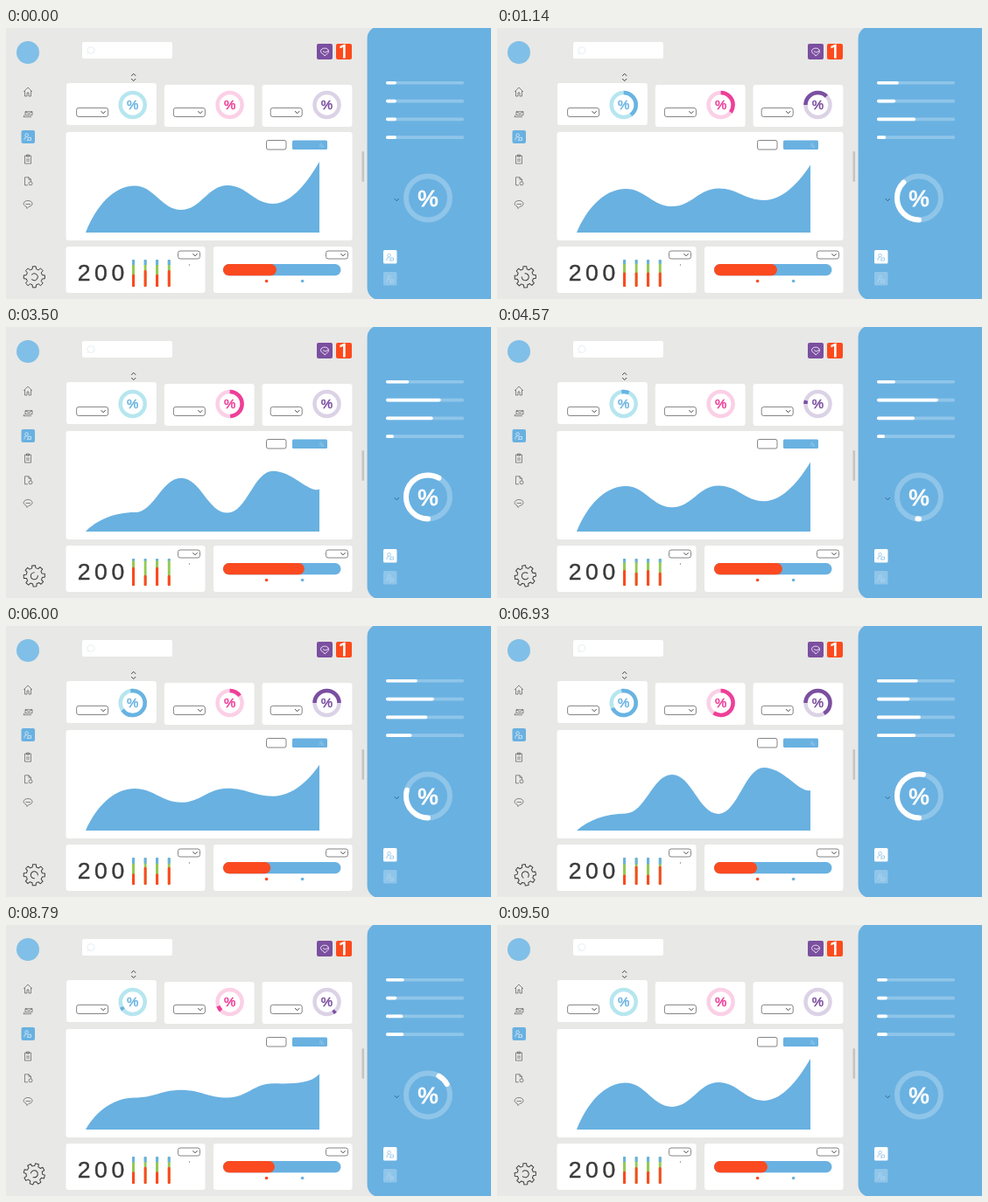
Recreate the animation shown at these times as an HTML page with a canvas. Size 554x310 px, loop 9.57 s.

```html
<!DOCTYPE html>
<html lang="en">
<head>
<meta charset="utf-8">
<title>Dashboard</title>
<style>
html, body { margin: 0; width: 100%; height: 100%; overflow: hidden; background: #e8e8e6; }
canvas { display: block; width: 554px; height: 310px; }
</style>
</head>
<body>
<canvas id="stage"></canvas>
<script>
const W = 554, H = 310, LOOP = 9.57;
const BLUE = '#69b1e1', PALE = '#8fc5e9', RED = '#fb4a20', GREEN = '#93c953', PURPLE = '#7b4fa0', INK = '#444';
const canvas = document.getElementById('stage');
const ctx = canvas.getContext('2d');
const scale = window.devicePixelRatio || 1;
canvas.width = W * scale;
canvas.height = H * scale;

const mix = (a, b, u) => a + (b - a) * u;

// Eased step from 0 to 1 between two times in seconds.
function ramp(t, from, to) {
  const u = Math.min(1, Math.max(0, (t - from) / (to - from)));
  return u * u * (3 - 2 * u);
}

// Eased value through [seconds, value] turning points.
const through = (...keys) => t => keys.slice(1).reduce(
  (v, [time, value], i) => v + (value - keys[i][1]) * ramp(t, keys[i][0], time), keys[0][1]);

// An arc that grows clockwise, then leaves by its tail, or winds back.
const sweep = (from, span, grow, grown, leave, gone, back = false) => t => {
  const out = span * ramp(t, leave, gone);
  const head = from + span * ramp(t, grow, grown) - (back ? out : 0);
  return [back ? from : from + out, head];
};

const sliders = [
  through([0, 12], [2.1, 35], [4.5, 21], [7.3, 48], [9.5, 12]),
  through([0, 12], [4.5, 70], [9, 12]),
  through([0, 12], [2.1, 69], [4.6, 43], [7, 50], [9.5, 12]),
  through([0, 12], [2, 9], [4.5, 9], [7.3, 46], [9.5, 12])
];
const tide = through([0, -.48], [3, 1], [6.8, -1], [9.5, -.48]);

const rings = [
  { color: '#69b3e2', base: '#b6e6ef',
    sweeps: [sweep(0, 255, 0, 2.1, 2.1, 3.4), sweep(-10, 255, 4.06, 6.25, 7, 9.1)] },
  { color: '#ee3f98', base: '#fbd0e6',
    sweeps: [sweep(0, 240, 0, 2.2, 3, 4.5, true), sweep(0, 250, 5.4, 7.4, 7.1, 9.2)] },
  { color: PURPLE, base: '#dcd2e6',
    sweeps: [sweep(270, 240, 0, 2.1, 2.1, 3.4), sweep(270, 240, 4.14, 6.9, 7, 9.1)] }
];
rings.forEach((item, i) => Object.assign(item, { x: 144.7 + i * 110.9, y: 88 }));
const dial = { x: 482, y: 194.4, r: 25, width: 6, cap: 'round', size: 26.5, color: '#fff', base: PALE,
  sweeps: [sweep(180, 240, 0, 2.1, 3.2, 4.55, true), sweep(180, 240, 4.3, 8, 7, 9.3)] };

// Heights at each turning point, then at the last handle and the end.
const KNOTS = [91, 147, 200, 253, 305, 358];
const CALM = [234, 180.5, 208, 180, 201, 173, 153];
const STEEP = [234, 214.5, 170, 215, 162, 192, 188];

const ICONS = {
  home: 'M-5 0L0-5L5 0M-3.5-1V5H-1V1H1V5H3.5V-1',
  mail: 'M-3-3H5V1H-3ZM-3-3L1-.5L5-3M-5 3H4M-4 1L-5 3',
  person: 'M-3.2-1.8A1.8 1.8 0 1 1 .4-1.8A1.8 1.8 0 1 1-3.2-1.8M-4 4V2Q-4 .5-1.4 .5M-1 4H3.5V1H0V4',
  clipboard: 'M-3.5-4H3.5V5H-3.5ZM-1.5-5H1.5V-3H-1.5ZM-2 0H2M-2 2H2',
  file: 'M-3.5-5H1L3.5-2.5V0M-3.5-5V4H0M1-5V-2.5H3.5M1 2A2 2 0 1 1 5 2A2 2 0 1 1 1 2',
  chat: 'M-2 2.6C-7 1-5-4 0-4C6-4 7 2 1 2.8L-1 5L-2 2.6M-2.5 0H3',
  badge: 'M-4.5-.5C-4.5-5 4.5-5 4.5-.5C4.5 2 2 3 0 5C-.5 2-4.5 3-4.5-.5M-2-.5L1 1L4.2-1'
};

function box(x, y, w, h, r, fill, stroke) {
  ctx.beginPath();
  ctx.roundRect(x, y, w, h, r);
  if (fill) { ctx.fillStyle = fill; ctx.fill(); }
  if (stroke) { ctx.strokeStyle = stroke; ctx.lineWidth = .8; ctx.stroke(); }
}

function disc(x, y, r, fill) {
  ctx.beginPath();
  ctx.arc(x, y, r, 0, Math.PI * 2);
  ctx.fillStyle = fill;
  ctx.fill();
}

function draw(path, x, y, color, width = .6, size = 1) {
  ctx.save();
  ctx.translate(x, y);
  ctx.scale(size, size);
  ctx.strokeStyle = color;
  ctx.lineWidth = width;
  ctx.lineJoin = 'round';
  ctx.stroke(new Path2D(path));
  ctx.restore();
}

function text(value, x, y, size, color, outline = 0, font = '"Liberation Sans", Arial') {
  ctx.font = `${size}px ${font}, sans-serif`;
  ctx.textAlign = 'center';
  ctx.fillStyle = ctx.strokeStyle = color;
  ctx.lineWidth = outline;
  ctx.fillText(value, x, y);
  if (outline) ctx.strokeText(value, x, y);
}

const chevron = (x, y, color = INK, flip = 1) =>
  draw(`M-2.5 ${-1.3 * flip}L0 ${1.3 * flip}L2.5 ${-1.3 * flip}`, x, y, color, 1);

function select(x, y, w, h) {
  box(x, y, w, h, 2.5, '#fff', '#666');
  chevron(x + w - 5.5, y + h / 2);
}

function ring({ x, y, color, base, sweeps, r = 14, width = 4.5, cap = 'butt', size = 15 }, t) {
  const arc = (from, to, stroke) => {
    const turn = degrees => (degrees - 90) * Math.PI / 180;
    ctx.beginPath();
    ctx.arc(x, y, r, turn(from), turn(to));
    ctx.strokeStyle = stroke;
    ctx.stroke();
  };
  ctx.lineWidth = width;
  ctx.lineCap = cap;
  arc(0, 360, base);
  for (const part of sweeps) {
    const [tail, head] = part(t);
    if (head - tail > .5) arc(tail, head, color);
  }
  ctx.lineCap = 'butt';
  text('%', x, y + size * .35, size, color, size * .035);
}

function gear(t) {
  const teeth = 8, step = Math.PI * 2 / teeth;
  ctx.save();
  ctx.translate(32.3, 284.8);
  ctx.rotate(t / LOOP * Math.PI * 2);
  ctx.strokeStyle = '#3d3d3d';
  ctx.lineWidth = 1;
  ctx.lineJoin = 'round';
  ctx.beginPath();
  for (let i = 0; i < teeth; i++) {
    for (const [offset, r] of [[-.3, 9.3], [-.2, 12.2], [.2, 12.2], [.3, 9.3]]) {
      const a = (i + offset) * step;
      ctx.lineTo(Math.cos(a) * r, Math.sin(a) * r);
    }
  }
  ctx.closePath();
  ctx.stroke();
  ctx.beginPath();
  ctx.arc(0, 0, 4, Math.PI + .65, Math.PI * 3 - .65);
  ctx.stroke();
  ctx.restore();
}

function sidebar(t) {
  disc(25, 28, 13, '#80bfe7');
  box(17.5, 117, 15.5, 15, 2, BLUE);
  ['home', 'mail', 'person', 'clipboard', 'file', 'chat'].forEach((name, i) =>
    draw(ICONS[name], 25, 73 + i * 25.7, name === 'person' ? '#fff' : INK));
  gear(t);
}

function header() {
  box(87, 16, 103, 19, 2, '#fff');
  draw('M-4 0A4 4 0 1 1 4 0A4 4 0 1 1-4 0M-3 3L-4.5 4.5', 97, 25.5, '#d5e2ea');
  box(355, 18, 18, 18, 2, PURPLE);
  draw(ICONS.badge, 364, 27, '#fff', .8);
  box(377, 18, 18, 18, 2, '#fc4a1c');
  text('1', 385.7, 34, 19.5, '#fff', .8, 'Roboto');
  chevron(145.7, 53.5, INK, -1);
  chevron(145.7, 59.3);
}

function cards(t) {
  rings.forEach((item, i) => {
    box(69 + i * 111.8, i ? 65 : 63, 102.8, 48, 3, '#fff');
    select(80.6 + i * 110.8, 91.4, 36, 10.1);
    ring(item, t);
  });
  box(68.5, 119, 327, 124, 3, '#fff');
  box(68.5, 250, 159, 53, 3, '#fff');
  box(237, 250, 158.5, 53, 3, '#fff');
}

function chart(t) {
  box(297.5, 128.5, 22.5, 10.5, 2, '#fff', '#666');
  box(327, 128.5, 40, 10.5, 1.5, BLUE);
  draw(ICONS.person, 360.5, 134, '#a5d0ec', .8, .6);

  // The curve swings to its steep pose and back twice per loop.
  const swing = through([.884, 0], [2.177, 1], [3.256, 1], [4.761, 0])(t % (LOOP / 2));
  const y = CALM.map((v, i) => mix(v, STEEP[i], swing));
  const last = KNOTS.length - 1;
  ctx.beginPath();
  ctx.moveTo(KNOTS[0], y[0]);
  for (let i = 1; i <= last; i++) {
    const a = KNOTS[i - 1], b = KNOTS[i];
    const first = i === 1, final = i === last;
    ctx.bezierCurveTo(
      mix(a, b, first ? .22 : .42), first ? mix(y[0], y[1], .58) : y[i - 1],
      mix(b, a, final ? .22 : .42), y[i],
      b, final ? y[i + 1] : y[i]);
  }
  ctx.lineTo(KNOTS[last], 234);
  ctx.lineTo(KNOTS[0], 234);
  ctx.closePath();
  ctx.fillStyle = BLUE;
  ctx.fill();
}

function totals(t) {
  select(196.5, 255, 25, 9);
  [...'200'].forEach((digit, i) => text(digit, 89 + i * 19.4, 289.4, 26.5, '#3a3a3a', .4));
  disc(209.5, 271, .7, '#777');
  const level = tide(t), blue = 269.8 - 2.6 * level;
  for (let i = 0; i < 4; i++) {
    const x = 143.9 + i * 13.55, red = 279.4 + (i % 2 ? 4.8 : -5) * level;
    ctx.save();
    ctx.beginPath();
    ctx.roundRect(x, 265, 3.3, 31, 1.2);
    ctx.clip();
    box(x, 265, 3.3, 31, 0, GREEN);
    box(x, 265, 3.3, blue - 265, 0, BLUE);
    box(x, red, 3.3, 296 - red, [1.5, 1.5, 0, 0], RED);
    ctx.restore();
  }
}

function balance(t) {
  select(365.5, 255, 25, 9);
  box(248, 270, 134.5, 13.3, 6.6, BLUE);
  box(248, 270, 72 + 23 * tide(t), 13.3, 6.6, RED);
  disc(297.6, 289.5, 1.8, RED);
  disc(338.6, 289.5, 1.8, BLUE);
}

function panel(t) {
  box(406.5, 141, 2.6, 35, 1.3, '#c4c4c3');
  box(412.6, -2, 160, 313, 14, BLUE);
  sliders.forEach((length, i) => {
    const y = 60.9 + i * 20.8;
    box(434, y, 89, 3.7, 1.5, PALE);
    box(434, y, length(t), 3.7, 1.8, '#fff');
  });
  chevron(446.3, 196.5, '#2f6690');
  ring(dial, t);
  box(431, 254, 15.5, 15.5, 1.5, '#fff');
  draw(ICONS.person, 439, 262, BLUE);
  box(431, 279, 15.5, 15.5, 1.5, PALE);
  draw(ICONS.person, 439, 287, '#b9dcf2');
}

function frame(t) {
  ctx.setTransform(scale, 0, 0, scale, 0, 0);
  ctx.fillStyle = '#e8e8e6';
  ctx.fillRect(0, 0, W, H);
  header();
  for (const part of [sidebar, cards, chart, totals, balance, panel]) part(t);
}

let began;
function tick(now) {
  began ??= now;
  frame((now - began) / 1000 % LOOP);
  requestAnimationFrame(tick);
}
frame(0);
requestAnimationFrame(tick);
</script>
</body>
</html>
```
